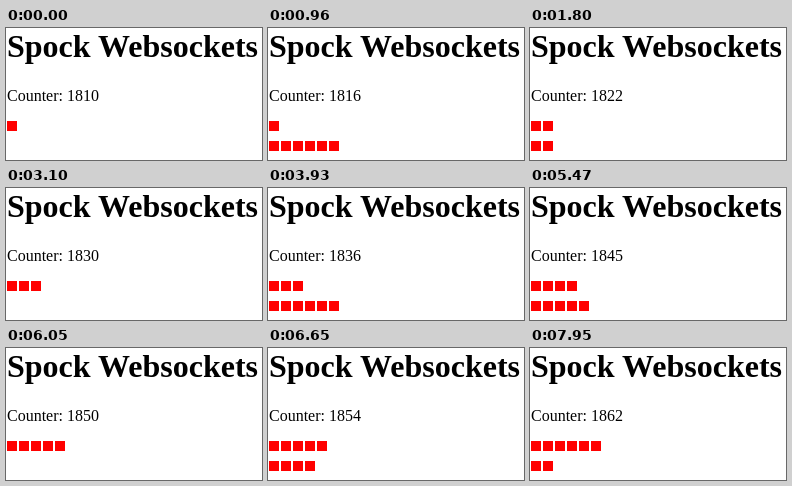
Animation of 256x132 px, one loop 8 s. Source, as an HTML page:

```html
<!DOCTYPE html>
<html lang="en">
<head>
<meta charset="utf-8">
<title>Spock Websockets</title>
<style>
  html, body { margin: 0; width: 100%; height: 100%; overflow: hidden; background: #fff; }
  svg { display: block; width: 256px; height: 132px; }
  text { font: 16px "Liberation Serif", Times, serif; fill: #000; white-space: pre; }
  .title { font-size: 32px; font-weight: bold; }
  rect { fill: #f00; }
</style>
</head>
<body>
<svg viewBox="0 0 256 132">
  <text class="title" x="1" y="29">Spock Websockets</text>
  <text id="label" x="1" y="73"></text>
  <g id="tens"></g>
  <g id="ones"></g>
</svg>
<script>
const LOOP = 8000, START = 1810;
// Runs of evenly spaced ticks: first ms, last ms, count.
const RUNS = [
  [120, 120, 1], [360, 720, 4], [960, 1200, 3], [1440, 1800, 4],
  [2040, 2270, 3], [2500, 2860, 4], [3100, 3460, 4], [3700, 3930, 3],
  [4170, 4520, 4], [4760, 5120, 4], [5360, 5590, 3], [5820, 6170, 4],
  [6410, 6650, 3], [6890, 7240, 4], [7480, 7710, 3], [7950, 7950, 1]
];
const ticks = RUNS.flatMap(([from, to, n]) =>
  Array.from({ length: n }, (_, i) =>
    n === 1 ? from : Math.round((from + (to - from) * i / (n - 1)) / 10) * 10));

const label = document.getElementById("label");

function makeRow(id, y) {
  const row = document.getElementById(id);
  return Array.from({ length: 9 }, (_, i) => {
    const box = document.createElementNS("http://www.w3.org/2000/svg", "rect");
    const attrs = { x: 1 + 12 * i, y, width: 10, height: 10 };
    for (const key in attrs) box.setAttribute(key, attrs[key]);
    return row.appendChild(box);
  });
}

const tens = makeRow("tens", 93);
const ones = makeRow("ones", 113);
const show = (row, n) =>
  row.forEach((box, i) => box.setAttribute("visibility", i < n ? "visible" : "hidden"));

let shown;
function draw(now) {
  const t = now % LOOP;
  const count = START + ticks.filter(tick => tick <= t).length;
  if (count !== shown) {
    shown = count;
    label.textContent = "Counter: " + count;
    show(tens, Math.floor(count / 10) % 10);
    show(ones, count % 10);
  }
}

let origin;
function frame(now) {
  origin ??= now;
  draw(now - origin);
  requestAnimationFrame(frame);
}
draw(0);
requestAnimationFrame(frame);
</script>
</body>
</html>
```
